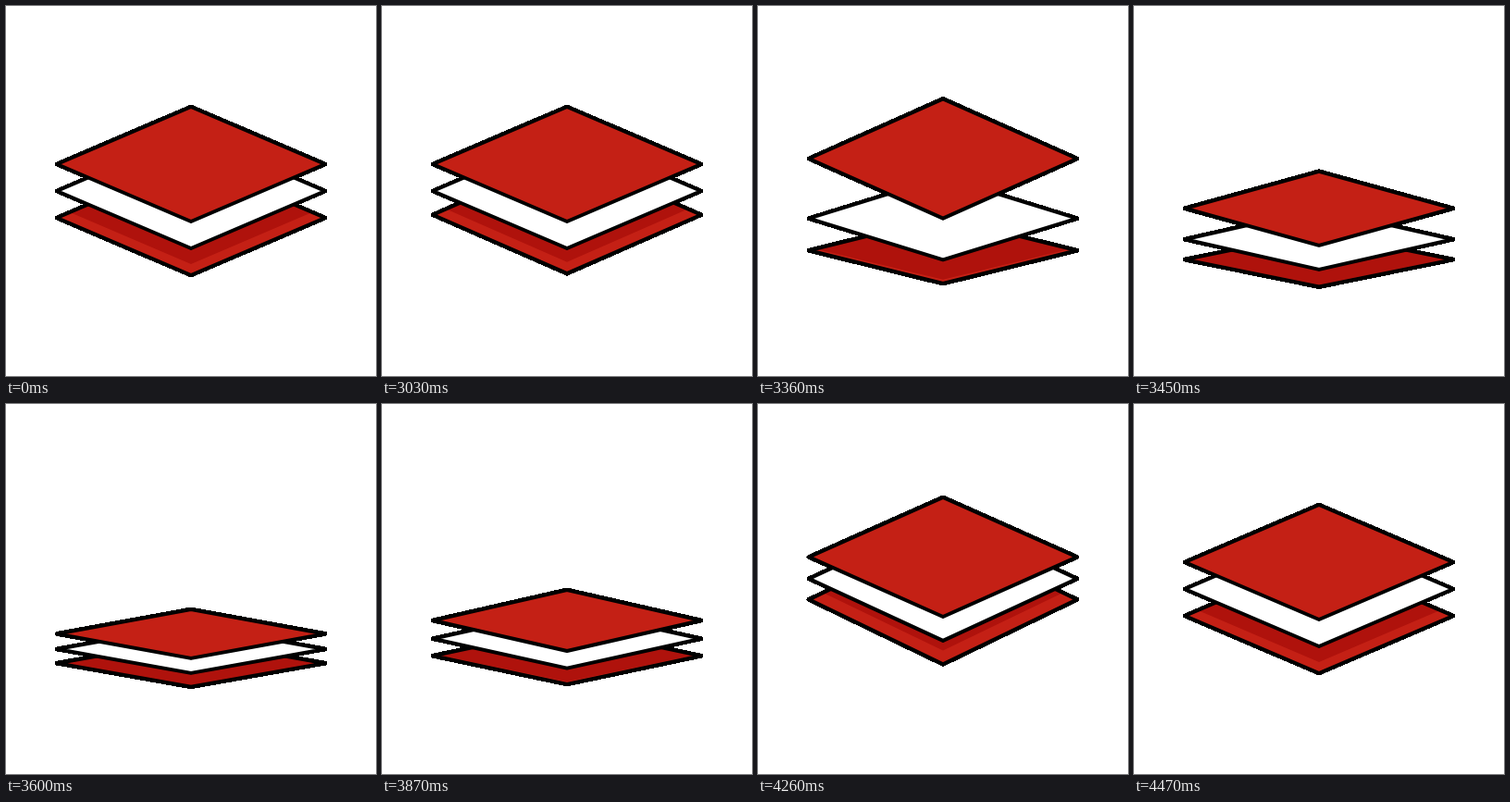
An HTML page that plays this animation: 400 px wide and 400 px high, repeating every 4530 ms.

```html
<!DOCTYPE html>
<html lang="en">
<head>
<meta charset="utf-8">
<title>Stacked layers</title>
<style>
  html, body { margin: 0; height: 100%; overflow: hidden; background: #fff; }
  svg { display: block; width: 100%; height: 100%; }

  path {
    d: var(--rest);
    animation: 4530ms linear infinite;
  }
  .sheet, .rim {
    stroke: #000;
    stroke-width: 4;
    stroke-linejoin: round;
  }
  /* Hard, slightly heavier edge around the whole stack. */
  .rim {
    stroke-width: 4.9;
    shape-rendering: crispEdges;
  }
  .red { fill: #c42015; }
  .white { fill: #fff; }
  .shade { fill: #af120c; }
  .outline { fill: none; }

  /* Each sheet has three poses: at rest, lifted, and pressed flat. */
  .top {
    --rest: path("M55 171L200 109L345 171L200 233Z");
    --high: path("M55 152L200 81.4L345 152L200 222.6Z");
    --low: path("M55 249L200 222.8L345 249L200 275.2Z");
    animation-name: top;
  }
  .middle {
    --rest: path("M55 200L200 138L345 200L200 262Z");
    --high: path("M55 181L200 110.4L345 181L200 251.6Z");
    --low: path("M55 265.2L200 239.4L345 265.2L200 291Z");
    animation-name: middle;
  }
  .bottom {
    --rest: path("M55 229L200 167L345 229L200 291Z");
    --high: path("M55 210L200 139.4L345 210L200 280.6Z");
    --low: path("M55 280.3L200 254.8L345 280.3L200 305.8Z");
    animation-name: bottom;
  }
  .shade {
    --rest: path("M69 223L200 167L331 223L200 279Z");
    --high: path("M70.4 202.5L200 139.4L329.6 202.5L200 265.6Z");
    --low: path("M57.8 279.8L200 254.8L342.2 279.8L200 304.8Z");
  }

  /* The bottom sheet leads the way down, the top sheet leads the way up. */
  @keyframes bottom {
    0%, 66.225% { d: var(--rest); animation-timing-function: cubic-bezier(.5, 0, .5, 1); }
    68.433% { d: var(--high); animation-timing-function: cubic-bezier(.22, 0, .27, 1); }
    80.132% { d: var(--low); animation-timing-function: cubic-bezier(.81, 0, .86, 1); }
    92.826% { d: var(--high); animation-timing-function: cubic-bezier(.5, 0, .5, 1); }
    98.675%, 100% { d: var(--rest); }
  }
  @keyframes middle {
    0%, 67.77% { d: var(--rest); animation-timing-function: cubic-bezier(.5, 0, .5, 1); }
    70.971% { d: var(--high); animation-timing-function: cubic-bezier(.22, 0, .27, 1); }
    80.132% { d: var(--low); animation-timing-function: cubic-bezier(.81, 0, .86, 1); }
    91.898% { d: var(--high); animation-timing-function: cubic-bezier(.5, 0, .5, 1); }
    96.645%, 100% { d: var(--rest); }
  }
  @keyframes top {
    0%, 69.536% { d: var(--rest); animation-timing-function: cubic-bezier(.5, 0, .5, 1); }
    73.267% { d: var(--high); animation-timing-function: cubic-bezier(.22, 0, .27, 1); }
    80.132%, 81.04% { d: var(--low); animation-timing-function: cubic-bezier(.81, 0, .86, 1); }
    90.309% { d: var(--high); animation-timing-function: cubic-bezier(.5, 0, .5, 1); }
    96.468%, 100% { d: var(--rest); }
  }
</style>
</head>
<body>
<svg viewBox="0 0 400 400">
  <path class="bottom rim outline"/>
  <path class="middle rim outline"/>
  <path class="top rim outline"/>
  <path class="bottom red"/>
  <path class="bottom shade"/>
  <path class="bottom sheet outline"/>
  <path class="middle sheet white"/>
  <path class="top sheet red"/>
</svg>
</body>
</html>
```
